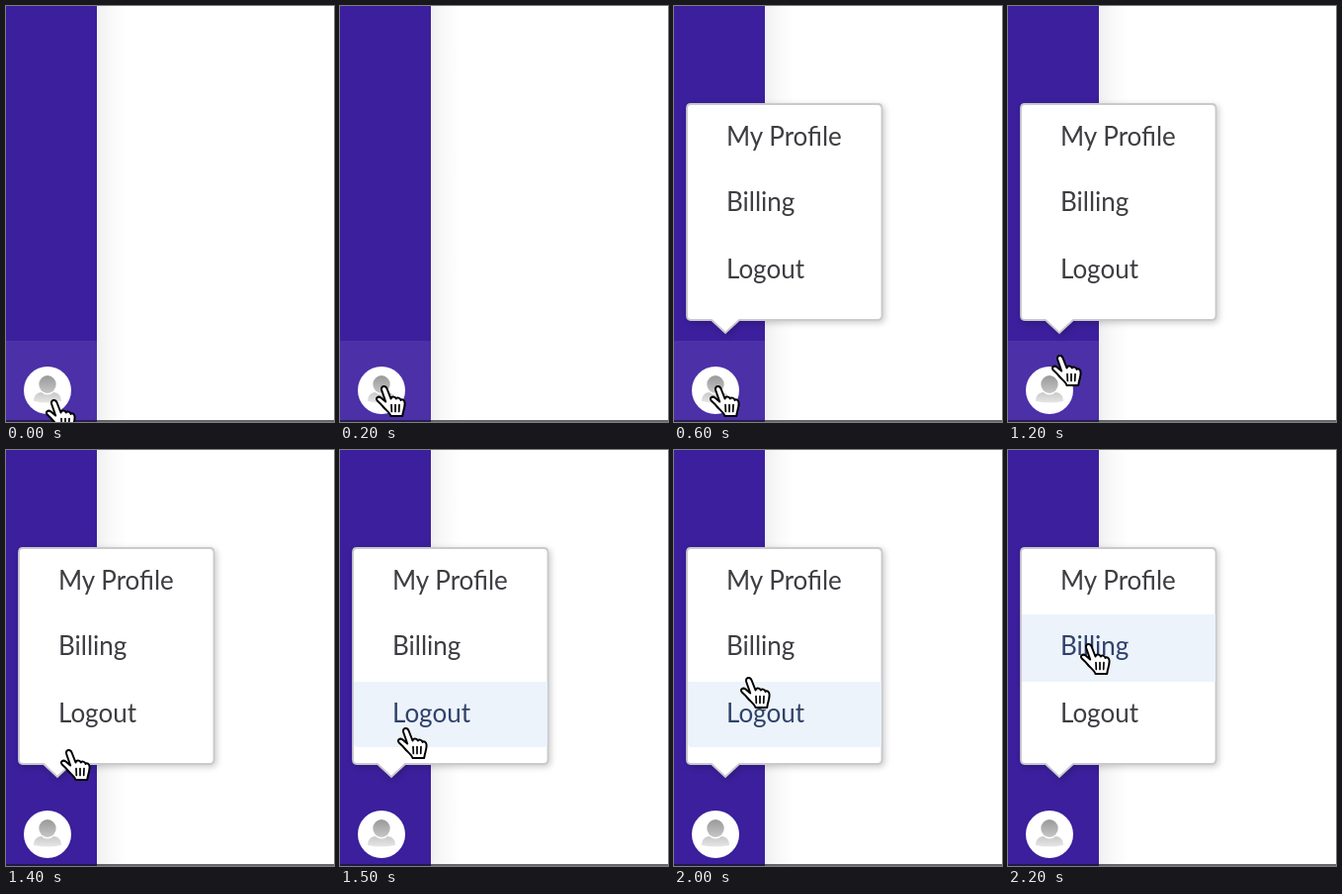
Recreate the animation shown at these times as an HTML page. Size 332x420 px, loop 3600 ms.

```html
<!DOCTYPE html>
<html lang="en">
<head>
<meta charset="utf-8">
<title>Profile menu</title>
<style>
  html, body { margin: 0; width: 100%; height: 100%; overflow: hidden; background: #fff; }
  svg { display: block; width: 332px; height: 420px; }
  text { font: 26px Lato, Carlito, sans-serif; fill: #3d3d42; }
  .menu { filter: drop-shadow(2px 2px 3px rgba(0, 0, 0, .2)); }

  /* Every state is held, then switched hard. */
  .anim { animation: 3600ms step-end infinite; }
  .hover { animation-name: hover; }
  .popup { animation-name: popup; }
  .logout { animation-name: logout; }
  .billing { animation-name: billing; }
  .logout-text { animation-name: logout-text; }
  .billing-text { animation-name: billing-text; }
  .cursor { animation-name: cursor; }

  @keyframes hover { 0% { opacity: 1; } 36.111%, 100% { opacity: 0; } }
  @keyframes popup { 0% { opacity: 0; } 16.666%, 100% { opacity: 1; } }
  @keyframes logout { 0%, 58.333%, 100% { opacity: 0; } 41.666% { opacity: 1; } }
  @keyframes billing { 0% { opacity: 0; } 58.333%, 100% { opacity: 1; } }
  @keyframes logout-text { 0%, 58.333%, 100% { fill: #3d3d42; } 41.666% { fill: #30426b; } }
  @keyframes billing-text { 0% { fill: #3d3d42; } 58.333%, 100% { fill: #30426b; } }
  @keyframes cursor {
    0% { transform: translate(49px, 398px); }
    2.777% { transform: translate(47px, 390px); }
    5.555% { transform: translate(45px, 384px); }
    33.333% { transform: translate(53px, 353px); }
    36.111% { transform: translate(59px, 328px); }
    38.888% { transform: translate(64px, 303px); }
    41.666% { transform: translate(67px, 281px); }
    44.444% { transform: translate(61px, 276px); }
    47.222% { transform: translate(57px, 271px); }
    50% { transform: translate(61px, 260px); }
    52.777% { transform: translate(69px, 245px); }
    55.555% { transform: translate(76px, 230px); }
    58.333% { transform: translate(80px, 211px); }
    61.111%, 100% { transform: translate(82px, 196px); }
  }
</style>
</head>
<body>
<svg viewBox="0 0 332 420">
  <defs>
    <linearGradient id="edge">
      <stop offset="0" stop-color="#f0f0f0"/>
      <stop offset=".45" stop-color="#f9f9f9"/>
      <stop offset="1" stop-color="#fff"/>
    </linearGradient>
    <linearGradient id="head" x2="0" y2="1">
      <stop offset="0" stop-color="#999"/>
      <stop offset="1" stop-color="#c6c6c6"/>
    </linearGradient>
    <linearGradient id="body" x2="0" y2="1">
      <stop offset="0" stop-color="#c9c9c9"/>
      <stop offset="1" stop-color="#e6e6e6"/>
    </linearGradient>
  </defs>

  <rect width="332" height="420" fill="#fff"/>
  <rect x="92" width="30" height="420" fill="url(#edge)"/>
  <rect width="92" height="420" fill="#3b1f9c"/>
  <rect class="anim hover" y="338" width="92" height="82" fill="#4c30a8"/>

  <g class="avatar">
    <circle cx="42" cy="388" r="24" fill="#fff"/>
    <path d="M28 399C28 393 32 390 36 390H48C52 390 56 393 56 399Q42 402 28 399Z" fill="url(#body)"/>
    <ellipse cx="42" cy="382.5" rx="9.5" ry="10" fill="#fff"/>
    <ellipse cx="42" cy="382" rx="8.7" ry="9" fill="url(#head)"/>
  </g>

  <rect y="418" width="332" height="2" fill="#17171c" fill-opacity=".65"/>

  <g class="anim popup">
    <path class="menu" d="M17 99H206Q210.500 99 210.500 103.500V312.500Q210.500 317 206 317H66L52 330L38 317H17Q13 317 13 312.500V103.500Q13 99 17 99Z"
          fill="#fff" stroke="#c9c9ce" stroke-width="1.800"/>
    <rect class="anim billing" x="14" y="166" width="196" height="68" fill="#ecf3fb"/>
    <path class="anim logout" d="M14 234H210V296Q210 300 206 300H18Q14 300 14 296Z" fill="#ecf3fb"/>
    <text x="53" y="141">My Profile</text>
    <text class="anim billing-text" x="53" y="207">Billing</text>
    <text class="anim logout-text" x="53" y="275">Logout</text>
  </g>

  <g class="anim cursor" stroke="#000" stroke-linecap="round" stroke-linejoin="round">
    <path d="M-2.800 4C-4 -.500 1 -1.500 2.600 2.500L6.500 12.500C7 9.800 10.800 9.800 11.800 12.500C12.500 10.800 15.800 11.300 16.600 14C17.600 12.500 20.500 13.500 20.600 17C20.700 22 18.800 24.500 18.200 30H6.500C5.500 26.500 1.500 24 -1 21C-3 18.500 -4.500 17 -7 14.800C-9.500 12 -6.500 9.300 -3.500 11.500L1.200 15.500Z"
          fill="#fff" stroke-width="2"/>
    <path d="M7 18.500L7.300 25.500M11 18.500V25.500M15 18.500L14.700 25.500" fill="none" stroke-width="1.700"/>
  </g>
</svg>
</body>
</html>
```
